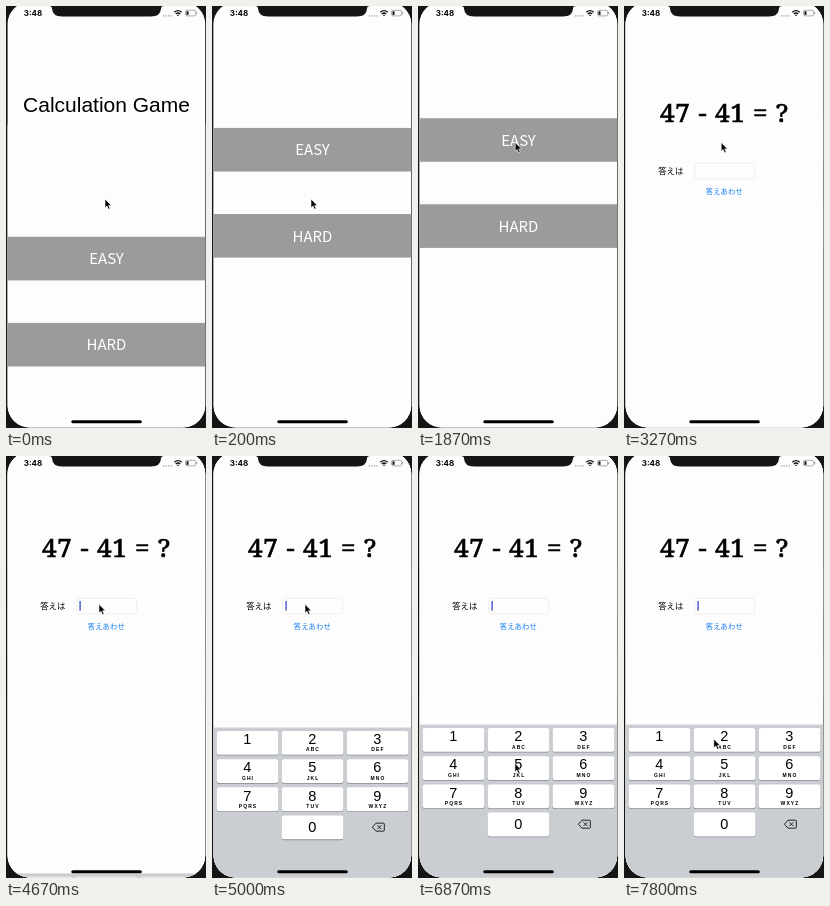
An HTML page that plays this animation: 200 px wide and 422 px high, repeating every 8000 ms.

```html
<!DOCTYPE html>
<html lang="ja">
<head>
<meta charset="utf-8">
<title>Calculation Game</title>
<style>
  html, body { margin: 0; width: 100%; height: 100%; overflow: hidden; background: #151515; }
  svg { display: block; width: 100%; height: 100%; }
  text { text-anchor: middle; font-family: "Noto Sans CJK JP", "Noto Sans CJK", sans-serif; }
  .title { font: 21px "Liberation Sans", sans-serif; }
  .button rect { fill: #9b9b9b; }
  .button text { fill: #fff; font-size: 15px; }
  .question text { font: 400 26px "Noto Serif", serif; letter-spacing: .7px; stroke: #000; stroke-width: .7; }
  .digit { font: 14.5px "Liberation Sans", sans-serif; }
  .letters { font: bold 5px "Liberation Sans", sans-serif; letter-spacing: 1.1px; }
  .clock { font: 700 8px Inter, sans-serif; }
</style>
</head>
<body>
<svg viewBox="0 0 200 422">
  <clipPath id="screen"><rect x="1.6" y="-4" width="197.6" height="425.4" rx="22"/></clipPath>
  <rect width="200" height="422" fill="#151515"/>
  <g clip-path="url(#screen)">
    <rect width="200" height="422" fill="#fdfdfd"/>
    <text class="title" x="100.5" y="105.7">Calculation Game</text>

    <g id="menu">
      <rect width="200" height="422" fill="#fdfdfd"/>
      <g class="button"><rect y="112.2" width="200" height="43.6"/><text id="easy" x="100.5" y="139.6">EASY</text></g>
      <g class="button"><rect y="198.3" width="200" height="43.6"/><text x="100.5" y="225.8">HARD</text></g>
    </g>

    <g id="game">
      <rect width="200" height="422" fill="#fdfdfd"/>
      <g class="question">
        <text x="51.2" y="101">47</text>
        <text x="78.9" y="101">-</text>
        <text x="106.2" y="101">41</text>
        <text x="136.5" y="101">=</text>
        <text x="158.3" y="101">?</text>
      </g>
      <text x="46.8" y="153" font-size="8.4">答えは</text>
      <rect x="70.7" y="142.3" width="60" height="15.6" rx="2.5" fill="#fdfdfd" stroke="#e9e9e9" stroke-width=".7"/>
      <rect id="caret" x="73.4" y="145" width="1.4" height="9.6" fill="#4257c9"/>
      <text x="100.3" y="172.8" font-size="7.4" fill="#1a7ff0">答えあわせ</text>
    </g>

    <g id="keyboard"><rect y="268.6" width="200" height="160" fill="#cacdd2"/></g>
    <rect x="65.3" y="414.3" width="70.5" height="3" rx="1.5"/>
  </g>

  <path d="M43 0Q46 0 46 2.5Q46.5 10.5 56 10.5H145Q154.5 10.5 155 2.5Q155 0 158 0Z" fill="#151515"/>
  <text class="clock" x="27" y="10.2">3:48</text>
  <path d="M157 9.8h9" stroke="#999" stroke-width="1.2" stroke-dasharray="1.2 1.3"/>
  <g fill="none" stroke="#111" stroke-width="1.3">
    <path d="M168.3 6.3Q172 3 175.7 6.3M169.8 8Q172 6.1 174.2 8"/>
    <path d="M171.3 9.3h1.4"/>
  </g>
  <rect x="179.5" y="4.3" width="10.2" height="5.6" rx="1.6" fill="none" stroke="#888" stroke-width=".7"/>
  <path d="M180.5 5.3h2v3.6h-2z" fill="#111"/>
  <path d="M190.7 6v2.2" stroke="#888" stroke-width=".8"/>

  <path id="cursor" d="M0 0V8.8L2 7 3.5 10.3 5 9.6 3.6 6.4H6.3Z" stroke="#fff" stroke-width=".6"/>
</svg>
<script>
const LOOP = 8000, FRAME = 1000 / 15;
const MENU_START = 0, GAME_START = 3066, KEYBOARD_START = 4666;
const byId = id => document.getElementById(id);
const [menu, game, keyboard, easy, caret, cursor] =
  ['menu', 'game', 'keyboard', 'easy', 'caret', 'cursor'].map(byId);

function buildKeyboard() {
  const letters = ['', 'ABC', 'DEF', 'GHI', 'JKL', 'MNO', 'PQRS', 'TUV', 'WXYZ'];
  const key = (column, row, digit, label) => {
    const x = 4.6 + column * 65, y = 272 + row * 28.2;
    return `<rect x="${x}" y="${y + .8}" width="61.8" height="23.8" rx="2.6" fill="#898b8f"/>
      <rect x="${x}" y="${y}" width="61.8" height="23.8" rx="2.6" fill="#fff"/>
      <text class="digit" x="${x + 30.7}" y="${y + (digit ? 13.2 : 16.8)}">${digit}</text>
      <text class="letters" x="${x + 31.4}" y="${y + 20.5}">${label}</text>`;
  };
  const keys = letters.map((label, i) => key(i % 3, Math.floor(i / 3), i + 1, label)).join('');
  const erase = `<g fill="none" stroke="#111" stroke-width=".9">
    <path d="M160.4 368.2L164 364.2H171.5Q172.3 364.2 172.3 365V371.4Q172.3 372.2 171.5 372.2H164Z"/>
    <path d="M165.5 366.3l3.8 3.8m0-3.8l-3.8 3.8"/></g>`;
  keyboard.innerHTML += keys + key(1, 3, 0, '') + erase;
}

// Pointer stops: time, x, y
const pointerPath = [
  [0, 99, 193], [530, 99, 193], [1400, 97.2, 142.3], [1670, 97.2, 137.3],
  [1800, 97.2, 137.3], [1866, 97.2, 136.5], [3600, 97.2, 136.5], [3866, 93, 148.3],
  [5000, 93, 148.3], [5530, 92.4, 214.3], [5670, 92.4, 214.3], [5930, 92, 261.5],
  [6070, 92, 261.5], [6930, 97, 308], [7200, 52, 304], [7500, 109, 311], [7800, 89.8, 283], [8000, 89.8, 283]
];

function pointerAt(t) {
  const next = Math.max(1, pointerPath.findIndex(p => p[0] > t));
  const [t0, x0, y0] = pointerPath[next - 1], [t1, x1, y1] = pointerPath[next];
  const u = (t - t0) / (t1 - t0), k = u * u * (3 - 2 * u);
  return [x0 + (x1 - x0) * k, y0 + (y1 - y0) * k];
}

const slide = (t, start, distance, decay) =>
  t < start ? 422 : distance * Math.exp(-(t - start) / decay);

const place = (node, x, y) => node.setAttribute('transform', `translate(${x} ${y})`);

function caretOpacity(t) {
  if (t < KEYBOARD_START) return 0;
  if (t < 4730) return 1;
  const phase = (t - 4700) % 1000;
  return phase < 500 ? Math.min(1, (phase + 30) / 70) : Math.max(0, 1 - (phase - 500) / 100);
}

function draw(t) {
  place(menu, 0, slide(t, MENU_START, 118.6, 80));
  place(game, 0, slide(t, GAME_START, 217, 75));
  place(keyboard, 0, slide(t, KEYBOARD_START, 150, 85));
  place(cursor, ...pointerAt(t));
  easy.setAttribute('opacity', t > 2860 && t < GAME_START ? .3 : 1);
  caret.setAttribute('opacity', caretOpacity(t));
}

function tick() {
  const t = performance.now() % LOOP;
  draw(Math.floor((t + 4) / FRAME) * FRAME % LOOP);
  requestAnimationFrame(tick);
}

buildKeyboard();
tick();
</script>
</body>
</html>
```
